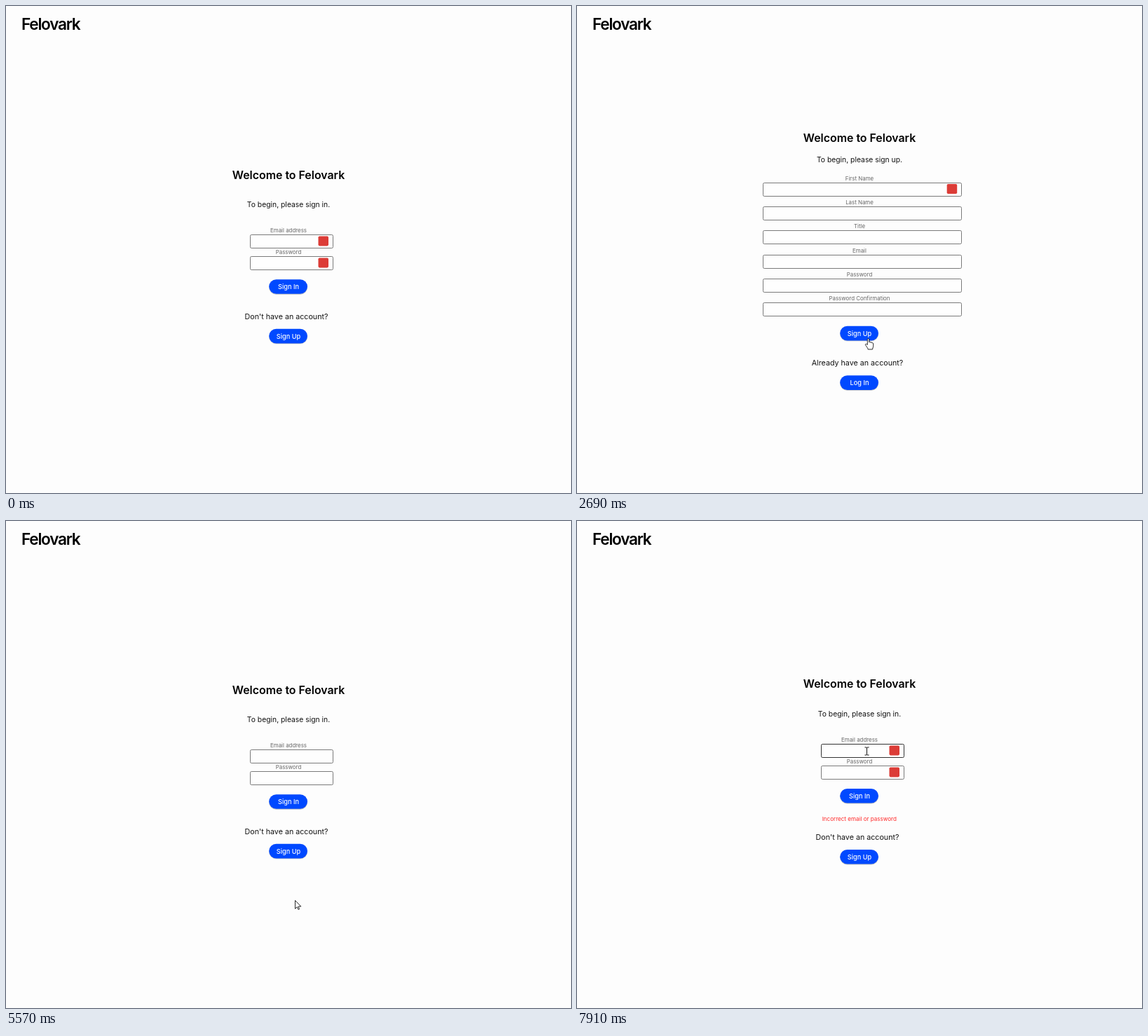
These frames come from a looping animation (806 by 695 pixels, 8000 ms). An HTML page:

```html
<!DOCTYPE html>
<html lang="en">
<head>
<meta charset="utf-8">
<title>Felovark</title>
<style>
  html, body { margin: 0; width: 100%; height: 100%; overflow: hidden; background: #fdfdfd; }
  svg { display: block; width: 806px; height: 695px; font-family: Inter, sans-serif; }
  text { text-anchor: middle; white-space: pre; }
  .brand { font-size: 22.6px; font-weight: 600; letter-spacing: -.055em; text-anchor: start; }
  .heading { font-size: 15.9px; font-weight: 600; }
  .intro { font-size: 10.35px; fill: #111; }
  .prompt { font-size: 10.7px; fill: #111; }
  .label { font-size: 7.9px; fill: #666; }
  .error { font-size: 8.05px; fill: #ff2a2a; }
  .action { font-size: 9.2px; font-weight: 500; fill: #fff; }
  .field { fill: #fefefe; stroke: #7a7a7a; }
  .field.hover { stroke: #333; }
  .shape { fill: #fff; stroke: #111; stroke-width: .9; stroke-linejoin: round; }
</style>
</head>
<body>
<svg id="stage" viewBox="0 0 806 695"></svg>
<script>
const LOOP = 8000;
const BRAND = 'Felovark';
const stage = document.getElementById('stage');

function add(parent, tag, attrs, content = '') {
  const node = document.createElementNS('http://www.w3.org/2000/svg', tag);
  for (const key in attrs) node.setAttribute(key, attrs[key]);
  node.textContent = content;
  parent.appendChild(node);
  return node;
}
const show = (node, on) => node.setAttribute('display', on ? 'inline' : 'none');

// A page collects its drawing plus the areas that change the pointer.
function makePage() {
  const group = add(stage, 'g', {});
  const areas = [];
  const area = (kind, x, y, w, h, node) => areas.push({ kind, x, y, w, h, node });
  return {
    group, areas,
    icons: [],
    text(kind, x, y, content) {
      add(group, 'text', { class: kind, x, y }, content);
      const half = content.length * (kind === 'label' ? 2.1 : 2.7);
      area('beam', x - half, y - (kind === 'label' ? 7 : 11), half * 2, kind === 'label' ? 9 : 14);
    },
    field(x, y, w) {
      const node = add(group, 'rect', { class: 'field', x: x + .5, y: y + .5, width: w - 1, height: 19, rx: 1.8 });
      area('beam', x, y, w, 20, node);
    },
    icon(x, y) {
      this.icons.push(add(group, 'rect', { x, y, width: 14.5, height: 14, rx: 1.8, fill: '#dc3c37' }));
    },
    button(y, content) {
      const box = { x: 375.2, width: 54.8, height: 20.6, rx: 10.3 };
      add(group, 'rect', { ...box, y: y + 1.2, fill: '#000', opacity: .13 });
      add(group, 'rect', { ...box, y: y + .6, fill: '#000', opacity: .13 });
      add(group, 'rect', { ...box, y, fill: '#0049ff' });
      add(group, 'text', { class: 'action', x: 403, y: y + 13.8 }, content);
      area('hand', 375, y, 55, 21);
    }
  };
}

function signInPage(shift) {
  const page = makePage();
  page.text('heading', 403, 246.6 - shift, 'Welcome to ' + BRAND);
  page.text('intro', 403, 287 - shift, 'To begin, please sign in.');
  ['Email address', 'Password'].forEach((name, i) => {
    const y = Math.round(326 + 31 * i - shift);
    page.text('label', 403, y - 2.6, name);
    page.field(348, y, 119);
    page.icon(445.5, y + 2.4);
  });
  page.button(390.2 - shift, 'Sign In');
  if (shift) page.text('error', 402.8, 427.5, 'Incorrect email or password');
  page.text('prompt', 400, 446.7 + shift, "Don't have an account?");
  page.button(460.8 + shift, 'Sign Up');
  return page;
}

function signUpPage() {
  const page = makePage();
  page.text('heading', 403, 193.8, 'Welcome to ' + BRAND);
  page.text('intro', 403, 223, 'To begin, please sign up.');
  ['First Name', 'Last Name', 'Title', 'Email', 'Password', 'Password Confirmation'].forEach((name, i) => {
    const y = Math.round(252 + 34.2 * i);
    page.text('label', 403, y - 3.4, name);
    page.field(265, y, 284);
  });
  page.icon(527.7, 254);
  page.button(456.8, 'Sign Up');
  page.text('prompt', 400, 513.2, 'Already have an account?');
  page.button(527.3, 'Log In');
  return page;
}

add(stage, 'rect', { width: 806, height: 695, fill: '#fdfdfd' });
add(stage, 'text', { class: 'brand', x: 22, y: 34.2 }, BRAND);
const pages = { signIn: signInPage(0), signUp: signUpPage(), failed: signInPage(8.2) };

const ring = add(stage, 'circle', { r: 8, fill: '#ffec00', opacity: .55 });
const pointer = add(stage, 'g', {});
const shapes = {
  arrow: add(pointer, 'path', { class: 'shape', d: 'M0 0V11.8L2.8 9.2 4.5 13 6.1 12.3 4.5 8.6H8.3Z' }),
  hand: add(pointer, 'path', { class: 'shape', d: 'M-1.2 9V1.2C-1.2-.2 1.2-.2 1.2 1.2V5.3C1.5 4.4 3.4 4.7 3.4 5.9 3.8 5.1 5.4 5.4 5.4 6.5 5.9 5.9 7.2 6.3 7.2 7.5V11C7.2 13 6 13.6 6 15.5H-.4C-.6 13.4-2 12.4-4 9.2-4.6 8-3 7-1.2 9Z' }),
  beam: add(pointer, 'path', { d: 'M-3-5.5H-1Q0-5.5 0-4.5Q0-5.5 1-5.5H3M-3 5.5H-1Q0 5.5 0 4.5Q0 5.5 1 5.5H3M0-4.5V4.5', fill: 'none', stroke: '#111' })
};

const easeOut = power => u => 1 - (1 - u) ** power;
const smooth = u => u * u * (3 - 2 * u);
const START = { x: 810, y: 714 };
const moves = [
  { from: 520, to: 1290, steps: 12, x: 424, y: 484, ease: easeOut(1.4) },
  { from: 1360, to: 1570, steps: 4, x: 415.5, y: 474.5, ease: easeOut(1.4) },
  { from: 3160, to: 3640, steps: 8, x: 412.5, y: 541.5, ease: smooth },
  { from: 5640, to: 6260, steps: 10, x: 410, y: 429, ease: smooth },
  { from: 6330, to: 6750, steps: 7, x: 409.8, y: 401, ease: easeOut(2) },
  { from: 7420, to: 7910, steps: 8, x: 413.5, y: 328.5, ease: smooth }
];
const clicks = [[2560, 2630], [5500, 5570], [6950, 7010]];

// The pointer is sampled in discrete steps, like a screen recording.
function pointerAt(t) {
  let { x, y } = START;
  for (const m of moves) {
    if (t < m.from) break;
    const gap = (m.to - m.from) / (m.steps - 1);
    const step = Math.min(m.steps, Math.floor((t - m.from) / gap + .001) + 1);
    const k = m.ease(step / m.steps);
    x += (m.x - x) * k;
    y += (m.y - y) * k;
  }
  return { x, y };
}

function pageAt(t) {
  if (t < 2630) return 'signIn';
  if (t < 5570) return 'signUp';
  return t < 7010 ? 'signIn' : 'failed';
}

function render(t) {
  const name = pageAt(t);
  const page = pages[name];
  for (const key in pages) show(pages[key].group, key === name);

  const iconsReady = !(t >= 2630 && t < 2690) && !(t >= 5570 && t < 5640);
  page.icons.forEach(icon => show(icon, iconsReady));

  const { x, y } = pointerAt(t);
  const inside = a => x >= a.x && x <= a.x + a.w && y >= a.y && y <= a.y + a.h;
  const hit = page.areas.filter(inside).pop();
  page.areas.forEach(a => a.node && a.node.classList.toggle('hover', a === hit));

  const kind = hit ? hit.kind : 'arrow';
  for (const key in shapes) show(shapes[key], key === kind);
  pointer.setAttribute('transform', `translate(${x} ${y})`);

  ring.setAttribute('cx', x);
  ring.setAttribute('cy', y);
  show(ring, clicks.some(([on, off]) => t >= on && t < off));
}

const begin = performance.now();
function tick() {
  render((performance.now() - begin) % LOOP);
  requestAnimationFrame(tick);
}
tick();
</script>
</body>
</html>
```
